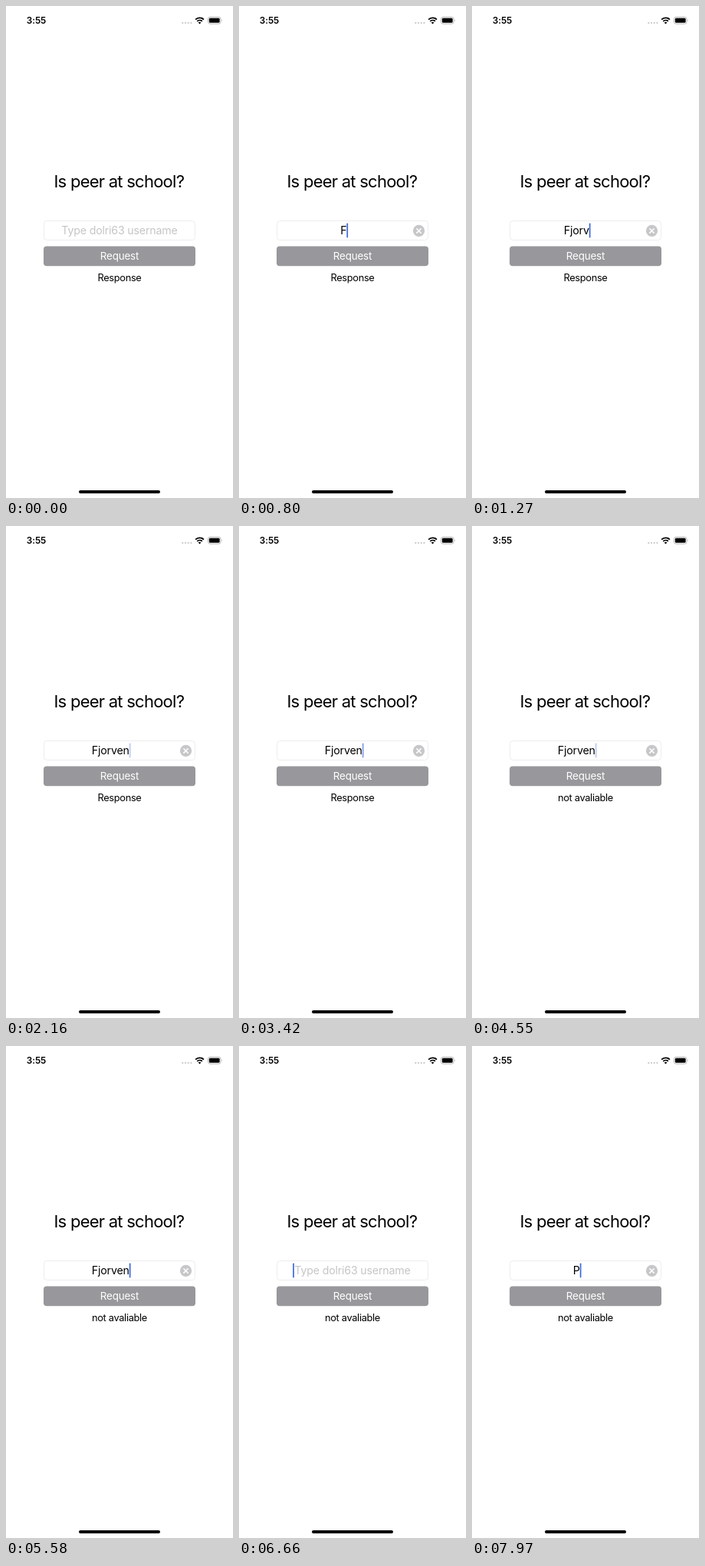
Write an HTML page that moves like this. It is 296 px wide and 640 px high and loops after 8000 ms.

```html
<!DOCTYPE html>
<html lang="en">
<head>
<meta charset="utf-8">
<title>Is peer at school?</title>
<style>
  html, body { margin: 0; height: 100%; overflow: hidden; background: #fff; }
  svg { display: block; width: 100vw; height: 100vh; }
  text { font-family: Inter, "Liberation Sans", sans-serif; text-anchor: middle; }
  .title { font-size: 22px; letter-spacing: -.75px; }
  .field { font-size: 14.2px; letter-spacing: -.18px; }
  .button { font-size: 13.4px; letter-spacing: -.18px; fill: #fff; }
  .label { font-size: 12.8px; letter-spacing: -.32px; }
  .clock { font-size: 11.8px; font-weight: 600; letter-spacing: -.1px; }
</style>
</head>
<body>
<svg viewBox="0 0 296 640">
  <text class="clock" x="39.5" y="23">3:55</text>
  <g fill="#c4c4c6">
    <circle cx="230.3" cy="22" r="1.1"/><circle cx="234" cy="22" r="1.1"/>
    <circle cx="237.7" cy="22" r="1.1"/><circle cx="241.4" cy="22" r="1.1"/>
  </g>
  <g fill="none" stroke="#000" stroke-width="1.8">
    <path d="M247.1 17.6a7.6 7.6 0 0 1 10.8 0M249.2 19.9a4.7 4.7 0 0 1 6.6 0"/>
    <path d="M252.5 23.4l-1.8-1.9a2.6 2.6 0 0 1 3.6 0z" fill="#000" stroke="none"/>
  </g>
  <rect x="263.4" y="14.4" width="16.6" height="8.8" rx="2.6" fill="none" stroke="#a8a8a8" stroke-width=".8"/>
  <rect x="264.8" y="15.8" width="13.8" height="6" rx="1.4"/>
  <path d="M281 17.3q1.3 1.5 0 3z" fill="#a8a8a8"/>

  <g id="form">
    <text class="title" x="147.3" y="236">Is peer at school?</text>
    <rect x="49.5" y="279.5" width="197" height="25" rx="4" fill="#fff" stroke="#ededee"/>
    <text id="hint" class="field" x="148" y="297.3" fill="#c5c5c7">Type dolri63 username</text>
    <text id="typed" class="field" x="136.3" y="297.3"></text>
    <rect id="caret" y="282.5" width="1.7" height="19" rx=".8" fill="#3d68dc"/>
    <g id="clear">
      <circle cx="234.5" cy="292.4" r="7.6" fill="#c7c7c9"/>
      <path d="M231.8 289.7l5.4 5.4m0-5.4l-5.4 5.4" stroke="#fff" stroke-width="1.5" stroke-linecap="round"/>
    </g>
    <rect x="49" y="312.4" width="198" height="25.8" rx="4" fill="#98989c"/>
    <text class="button" x="148" y="330.2">Request</text>
  </g>
  <text id="reply" class="label" x="148" y="358.2"></text>
  <rect x="95" y="630" width="106" height="4" rx="2"/>
</svg>
<script>
const LOOP = 8000, NAME = "Fjorven";
const $ = id => document.getElementById(id);
const show = (id, on) => $(id).style.display = on ? "" : "none";

// Each track is a list of [start ms, value]; a value holds until the next start.
const typing = [[0, ""], [800, NAME.slice(0, 1)], [910, NAME.slice(0, 3)],
  [1130, NAME.slice(0, 4)], [1270, NAME.slice(0, 5)], [1430, NAME.slice(0, 6)],
  [1540, NAME], [6660, ""], [7970, "P"]];
const blink = [[0, 0], [260, 1], [2160, .35], [2400, .65], [2520, 1],
  [3060, .35], [3180, 0], [3420, .65], [3540, 1], [4200, .35], [4440, .2],
  [4550, .35], [5100, .2], [5220, 0], [5460, .65], [5580, 1], [6120, 0],
  [6660, 1], [6780, 0], [7020, .65], [7140, 1], [7680, .35], [7800, 0], [7970, 1]];
const replies = [[0, "Response"], [3810, ""], [4440, "not avaliable"]];
const clearing = [[0, false], [800, true], [6120, false], [7970, true]];

const at = (track, t) => track.findLast(([start]) => start <= t)[1];

function draw(t) {
  const text = at(typing, t), reply = at(replies, t);
  $("typed").textContent = text;
  $("reply").textContent = reply;
  show("hint", !text);
  show("clear", at(clearing, t));
  $("caret").setAttribute("x", text ? 136.3 + $("typed").getComputedTextLength() / 2 : 70.2);
  $("caret").setAttribute("opacity", at(blink, t));
  $("form").setAttribute("transform", `translate(0 ${reply ? 0 : 7.5})`);
}

const begin = performance.now();
function tick() {
  draw((performance.now() - begin) % LOOP);
  requestAnimationFrame(tick);
}
tick();
</script>
</body>
</html>
```
